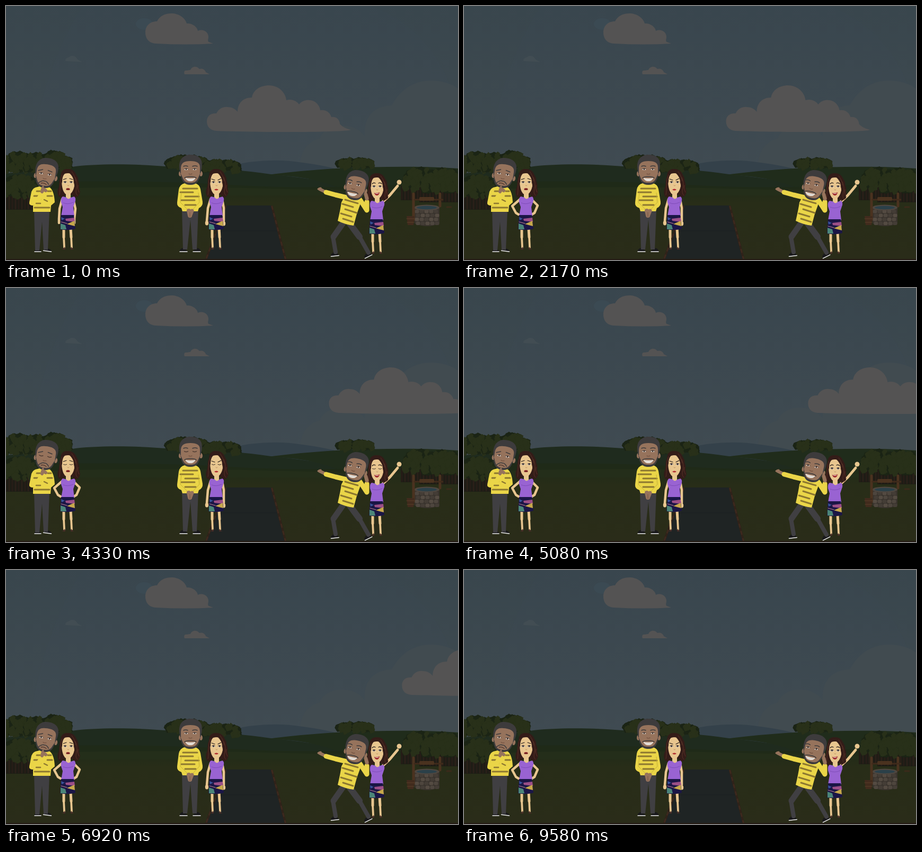
Recreate the animation shown at these times as an HTML page. Size 853 px wide and 480 px high, loop 9760 ms.

```html
<!DOCTYPE html>
<html>
<head>
<meta charset="utf-8">
<style>
html, body { margin: 0; width: 100%; height: 100%; overflow: hidden; background: #3b474e }
svg { display: block; width: 100%; height: 100% }
polyline { fill: none; stroke-linejoin: round; stroke-linecap: round }
</style>
</head>
<body>
<svg id="stage" viewBox="0 0 853 480" preserveAspectRatio="none"></svg>
<script>
const SKIN = '#e8c68f', BROWN = '#96735c', HAIR = '#3d3b3c', YELLOW = '#ead548',
  STRIPE = '#8c7730', PANTS = '#403f42', TRESS = '#331c18', INK = '#241b1a';

let seed = 11;
const rand = () => (seed = seed * 16807 % 2147483647) / 2147483647;
const fill = (color, d, extra = '') => `<path fill="${color}" d="${d}" ${extra}/>`;
const line = (color, width, d, extra = '') => `<path fill="none" stroke="${color}" stroke-width="${width}" stroke-linecap="round" d="${d}" ${extra}/>`;
const limb = (color, width, points, id = '') => `<polyline ${id && `id="${id}"`} stroke="${color}" stroke-width="${width}" points="${points}"/>`;
const oval = (color, x, y, rx, ry = rx) => `<ellipse fill="${color}" cx="${x}" cy="${y}" rx="${rx}" ry="${ry}"/>`;
const at = (x, y, art, turn = 0) => `<g transform="translate(${x} ${y}) rotate(${turn})">${art}</g>`;

// Flat-bottomed clumps of foliage: dark mass, lighter tufts, optional trunks
function grove(x, y, w, h, trunks = 0) {
  let art = '';
  if (trunks) art += `<rect x="${x}" y="${y + h - 10}" width="${w}" height="${trunks + 4}" fill="#1d1c15"/>`;
  for (let i = 2; trunks && i < w; i += 6)
    art += line(i % 4 ? '#261d17' : '#2a2019', 3, `M${x + i} ${y + h - 8}v${trunks}`);
  const count = w * h / 22;
  for (let i = 0; i < count; i++) {
    const u = rand(), light = i > count * .6, r = light ? 3 + rand() * 3 : 5 + rand() * 3;
    const top = .6 * Math.abs(2 * u - 1) ** 3, v = top + rand() * (1 - top);
    const cx = x + r + u * (w - 2 * r), cy = y + r + v * (h - 2 * r);
    art += fill(light ? '#283019' : '#1b2415',
      `M${cx - r} ${cy}l2 ${-r * .7} ${r * .5} -1 ${r * .5} -2 ${r * .6} 2 2 1 -1 4 2 4 -4 3 ${-r} 1z`);
  }
  return art;
}

function scenery() {
  let stones = '';
  for (let row = 0; row < 4; row++)
    for (let i = 0; i < 5; i++)
      stones += `<rect x="${771.5 + i * 9 + row % 2 * 2}" y="${385 + row * 7.5}" width="8" height="6.5" rx="2.5" fill="${['#4e463e', '#443d36', '#544b42'][(i + row) % 3]}"/>`;
  const bricks = d => line('#2f2219', 4, d) + line('#3d291e', 3, d, 'stroke-dasharray="5 9"');
  return `<defs>
    <linearGradient id="sky" x2="0" y2="1"><stop stop-color="#39464d"/><stop offset="1" stop-color="#404b51"/></linearGradient>
    <linearGradient id="field" x2="0" y2="1"><stop stop-color="#212b18"/><stop offset=".2" stop-color="#282d18"/><stop offset="1" stop-color="#2a2c19"/></linearGradient>
    </defs><rect width="853" height="320" fill="url(#sky)"/>` +
    fill('#49595f', 'M40 320C50 210 95 70 145 0H690C780 35 825 100 853 190V320Z', 'opacity=".05"') +
    fill('#414b50', 'M555 310C553 280 565 258 592 250C600 232 618 226 633 226C652 226 668 233 677 246C674 205 700 188 728 188C745 155 773 141 802 141C825 141 842 148 853 156V310Z') +
    oval('#3b4a53', 261, 34, 16, 11) +
    fill('#424d53', 'M112 104C112 97 118 98 121 95C127 92 133 96 135 101L144 106Z') +
    fill('#545353', 'M283 71C268 70 263 60 263 50C263 38 271 29 285 29C290 19 300 14 312 14C326 14 338 22 341 33C352 32 361 40 362 47C373 42 383 50 382 60Q380 67 383 68L391 71Q340 74 283 71Z') +
    fill('#545353', 'M337 129C335 125 337 121 341 122C344 121 347 121 348 121C350 114 360 112 365 119C371 117 376 121 377 125L384 129Z') +
    `<g id="cloud">${fill('#545353', 'M397 236C384 235 379 227 379 218C379 208 386 202 397 203C402 193 411 190 418 191C428 191 434 196 437 200C437 184 447 173 464 173C466 159 480 150 496 150C513 150 527 162 529 178C539 175 548 179 553 186C560 177 572 176 581 180C588 184 592 190 593 197C604 195 612 202 614 210C623 208 630 215 630 223C635 229 643 232 651 234C640 239 480 239 397 236Z')}</g>` +
    fill('#34414a', 'M420 303Q490 285 560 296Q600 301 640 312L560 340H420Z') +
    fill('#1f2b1e', 'M0 316Q90 309 125 304C165 298 240 298 300 303Q420 306 500 318Q600 328 660 345H0Z') +
    fill('#202c1b', 'M495 319Q600 305 720 304Q800 303 853 307V350H640Q590 322 495 319Z') +
    fill('#1f2a18', 'M0 335Q220 326 420 338T853 330V400H0Z') +
    '<rect y="346" width="853" height="134" fill="url(#field)"/>' +
    fill('#242e1a', 'M60 346Q300 338 560 347T853 347V358H60Z') +
    grove(-12, 274, 74, 40) + grove(30, 272, 96, 40) + grove(297, 281, 86, 25) + grove(366, 289, 77, 24) +
    grove(620, 286, 74, 20) + grove(-14, 317, 74, 44, 30) + grove(745, 303, 70, 46, 24) + grove(780, 305, 86, 48, 24) +
    fill('#1f2424', 'M415 377H500L526 480H378Z') + line('#1b1f20', 1, 'M397 425H512') +
    bricks('M414 379L377 480') + bricks('M502 379L528 480') +
    '<rect y="478" width="853" height="2" fill="#241b14"/>' +
    fill('#39332d', 'M770 381H818V411Q795 421 771 411Z') + stones +
    oval('#4e463f', 794, 381, 24, 5.5) + oval('#2b4049', 794, 381, 19, 3.3) +
    line('#4a321f', 5, 'M769 355V404M819 355V378') + line('#3f2a1b', 3, 'M771 366H824') +
    '<rect x="780" y="361" width="28" height="7" rx="2" fill="#4a321f"/>' +
    fill('#412b1d', 'M756 397H771L769 414H758Z') + line('#5a3e28', 1, 'M756 402H771M757 409H770') +
    line('#3b2a1a', 3, 'M832 380h8');
}

// Lids cover open eyes while blinking
function eyes(skin, spots, rx, ry, iris) {
  const open = spots.map(([x, y]) => oval('#e6dbd0', x, y, rx, ry) + oval(iris, x, y, ry * .8)
    + line(INK, .8, `M${x - rx} ${y - ry * .3}q${rx} ${-ry * 1.4} ${rx * 2} 0`)).join('');
  const shut = spots.map(([x, y]) => oval(skin, x, y, rx + 1, ry + 1) + line(INK, .9, `M${x - rx} ${y + .4}q${rx} 2 ${rx * 2} 0`)).join('');
  return [open, `<g class="lids">${shut}</g>`];
}

function manHead(mood) {
  const [open, shut] = eyes(BROWN, [[-8, -4.5], [8, -4.5]], 3.7, 1.7, '#2b1c17');
  const sad = mood == 'sad', [dx, dy] = { sad: [-1, 3], happy: [0, 0], lean: [-4, 0] }[mood];
  const features = open + (mood == 'lean' ? '' : shut) +
    line(HAIR, 1.5, sad ? 'M-14 -9L-6 -12M4 -12L12 -10' : 'M-13 -10Q-9 -12 -5 -10M4 -10Q9 -12 13 -10') +
    line('#6f4d3d', 1.1, 'M-3 4Q0 6 3 4') +
    line(HAIR, 1.6, sad ? 'M-10 14Q-4 8 0 9Q5 8 9 14' : 'M-11 12Q-8 9 0 9.5Q8 9 11 12') +
    (sad ? line('#3d2520', 1.1, 'M-5 14Q0 12 5 15')
      : fill('#f4efe9', 'M-9.5 12Q0 14 9.5 12Q7 18 0 18Q-7 18 -9.5 12Z') + line('#8b807a', .5, 'M-8 14.5Q0 17 8 14.5'));
  return oval(BROWN, -19, 4, 3, 5) + oval(BROWN, 20, 4, 3, 5) +
    fill(HAIR, 'M-19 3C-22 -6 -22 -17 -18 -23C-12 -31 -6 -32 2 -32C12 -32 19 -27 21 -20C23 -10 21 -3 19 3Z') +
    fill(BROWN, 'M-18 2V-8C-17 -16 -13 -20 0 -20C13 -20 18 -16 18 -8V2L17 10C15 20 9 25 0 25C-9 25 -15 20 -17 10Z') +
    fill(HAIR, 'M-19 2L-17 12C-14 21 -9 25 0 25C9 25 14 21 17 12L19 2L14 13C11 20 6 21 0 21C-6 21 -11 20 -14 13Z') +
    at(dx, dy, features);
}

const shoe = (x, y, w, turn = 0) => at(x, y, fill('#19191b', `M0 0Q${w * .4} -6 ${w * .5} -2Q${w} -1 ${w} 3H0Z`) + line('#ededed', 1.5, `M0 3.3H${w}`), turn);

function thinker() {
  return shoe(54, 461, 12) + shoe(71, 459, 15, 8) +
    fill(PANTS, 'M53 386H82L79 461H71L68 408L63 462H55Z') +
    fill(YELLOW, 'M59 342Q51 343 48 351L44 371Q43 377 51 377L51 389H84L85 377L92 371Q91 350 83 343Q70 338 59 342Z') +
    line(STRIPE, 3, 'M58 350H68M79 350H85M53 359H62M78 359H87M54 381H82') +
    line('#c9b536', 1, 'M51 377Q61 377 71 373M70 352L66 366') + limb(YELLOW, 8, '87,367 68,371 55,373') +
    limb(YELLOW, 9, '51,371 62,364 68,354') + line(STRIPE, 2.5, 'M72 366L78 369M57 373H65') +
    at(75, 319, manHead('sad'), 9) + limb(BROWN, 6, '68,351 71,346 75,349') + limb(BROWN, 3, '67,347 70,341');
}

function greeter() {
  return shoe(328, 461, 14) + shoe(367, 461, -14) +
    fill(PANTS, 'M332 384H363L360 460H352L348 404L342 460H334Z') +
    fill(YELLOW, 'M337 335Q328 337 326 347L323 371Q322 379 331 382L333 388H362L364 382Q372 378 371 370L367 346Q365 337 357 335Q347 331 337 335Z') +
    line(STRIPE, 3, 'M334 345H361M329 352H353M338 360H364M331 367H356M338 376H358') +
    line('#c7b235', 1, 'M331 353L329 371L342 384M363 353L365 371L353 384') +
    limb(BROWN, 8, '345,387 347,396') + limb(BROWN, 7, '351,387 348,395') + line('#70503f', .8, 'M347 390V398') +
    at(348, 313, manHead('happy'));
}

function pointer() {
  return shoe(613, 470, 15, -7) + shoe(676, 474, 15, -27) +
    limb(PANTS, 11, '637,409 618,436') + limb(PANTS, 8, '617,436 622,465') +
    limb(PANTS, 12, '647,409 667,436') + limb(PANTS, 8, '667,436 684,466') +
    limb(BROWN, 6, '602,351 592,346') + limb(BROWN, 3, '594,344 589,346') +
    limb(YELLOW, 9, '643,362 622,357 604,352') + limb(YELLOW, 9, '668,366 681,386 681,370') +
    limb(BROWN, 7, '681,364 679,356') +
    fill(YELLOW, 'M640 358Q655 354 672 365L662 393L656 415Q640 413 626 406Q631 385 633 371Z') +
    line(STRIPE, 3, 'M640 366L664 373M635 374L655 380M640 384L662 391M632 392L652 398M636 402L655 408') +
    at(660, 342, manHead('lean'), 12);
}

// Drawn around the left-hand woman; the others are shifted copies
function woman(mood, arms) {
  const [open, shut] = eyes(SKIN, [[111.5, 333], [123, 333]], 3, 1.9, '#2c211c');
  const looks = {
    worried: line(INK, 1.2, 'M108 328L114 326M120 326L126 328') + oval('#8e2c2c', 117, 346, 3.6, 2.1) + line('#54191a', .9, 'M114 347Q117 345 120 347'),
    stern: line(INK, 1.2, 'M108 327L114 329M120 329L126 326') + fill('#b02a2e', 'M113 347Q117 344 121 347Q117 350 113 347Z'),
    glad: line(INK, 1.2, 'M108 328Q111 325 114 327M120 327Q123 325 126 328') + fill('#9d2529', 'M112 345Q117 346 122 344Q121 350 117 350Q113 350 112 345Z') + line('#f2ebe5', 1, 'M114 346Q117 347 120 346'),
  };
  const foot = (x, d) => fill('#4a2d28', `M${x} 455l${3 * d} 4 ${3 * d} 1h${-7 * d}z`);
  return fill(TRESS, 'M117 308C107 307 103 314 103 322C99 329 102 337 99 344C96 351 97 358 101 361C106 363 109 360 111 357H126C127 363 134 363 138 357C142 351 138 347 138 341C140 335 135 331 135 325C132 315 128 308 117 308Z') +
    limb(SKIN, 5, '109,420 109,437') + limb(SKIN, 3.8, '109,436 110,456') +
    limb(SKIN, 5, '122,420 123,437') + limb(SKIN, 3.8, '123,436 124,456') + foot(111, -1) + foot(123, 1) + arms +
    fill(SKIN, 'M113 353H122V366H113Z') +
    fill('#9963d2', 'M107 360Q113 361 114 362Q118 367 122 362L129 360Q133 365 130 371L127 380L129 397H104L107 380L104 371Q103 362 107 360Z') +
    line('#7f4db8', 1, 'M108 372Q116 376 127 371') +
    fill('#1b1646', 'M104 395H128L131 421Q118 425 102 422Z') +
    fill('#9b4f87', 'M112 402L129 400L130 408L113 406Z') + fill('#c7a84b', 'M115 412L129 406L130 416L122 414Z') +
    fill('#4b8579', 'M103 411L112 414L114 422L103 422Z') + fill('#39549c', 'M104 399L111 402L105 405Z') + line('#c48894', 1, 'M104 408L115 411') +
    fill(SKIN, 'M105 329C104 320 109 316 117 316C125 316 130 321 130 332C130 344 124 357 117 357C110 357 105 346 105 329Z') +
    fill(TRESS, 'M119 310C111 315 106 320 106 332Q103 340 106 350Q108 357 104 361L98 354L102 330Q103 314 119 310ZM115 310C121 318 128 322 128 334C131 342 126 350 129 361L138 355L136 325Q131 313 115 310Z') +
    line('#573126', 1, 'M106 319Q102 328 102 342T101 357M131 324Q136 336 133 345T135 358M124 313Q130 320 132 331M136 339Q134 345 138 352') +
    open + shut + line('#b98d62', 1, 'M116 339Q118 341 119 339') + looks[mood];
}

const fist = (x, y) => oval(SKIN, x, y, 3.2, 4.5);
const hanging = limb(SKIN, 4.5, '106,365 101,382 99,406') + fist(99, 410) + limb(SKIN, 4.5, '128,365 131,382 131,406') + fist(131, 411);
const raised = limb(SKIN, 5, '128,362 141,350 156,332') + oval(SKIN, 159, 325, 4.5, 4.5);
const bending = limb(SKIN, 4.5, '', 'leftArm') + limb(SKIN, 4.5, '', 'rightArm');

stage.innerHTML = scenery() + thinker() + woman('worried', bending) +
  greeter() + at(280, 0, woman('stern', hanging)) +
  at(583, 8, woman('glad', raised)) + pointer();

const LOOP = 9760, BLINK = 4160;
const cloud = document.getElementById('cloud'), lids = document.querySelectorAll('.lids');
const arms = [
  [leftArm, [106, 365, 101, 383, 100, 402, 100, 410], [106, 365, 91, 378, 98, 391, 103, 394]],
  [rightArm, [127, 365, 131, 383, 129, 402, 129, 410], [127, 365, 139, 377, 133, 391, 128, 394]],
];

function frame(now) {
  const t = now % LOOP;
  cloud.setAttribute('transform', `translate(${t * .0532} 0)`);
  const p = Math.min(1, Math.max(0, (t - 120) / 600)), ease = p * p * (3 - 2 * p);
  for (const [arm, from, to] of arms)
    arm.setAttribute('points', from.map((v, i) => v + (to[i] - v) * ease));
  const shut = Math.abs(t % BLINK - 170) < 85;
  lids.forEach(lid => lid.setAttribute('visibility', shut ? 'visible' : 'hidden'));
  requestAnimationFrame(frame);
}
requestAnimationFrame(frame);
</script>
</body>
</html>
```
